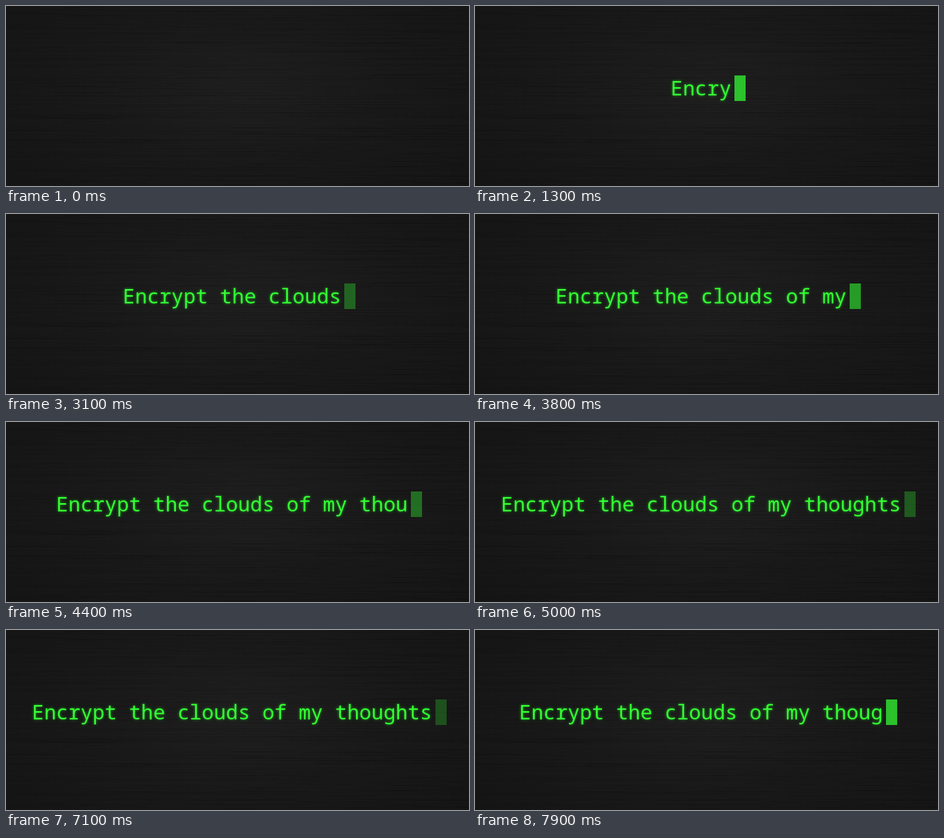
Write an HTML page with a canvas that moves like this. It is 828x324 px and loops after 8000 ms.

```html
<!DOCTYPE html>
<html lang="en">
<head>
<meta charset="utf-8">
<title>Typing line</title>
<style>
  html, body { margin: 0; width: 100%; height: 100%; overflow: hidden; background: #181818; }
  #stage { position: relative; width: 828px; height: 324px; overflow: hidden; }
  canvas { position: absolute; left: 0; top: 0; }
  #line, #cursor { position: absolute; left: 0; top: 125px; height: 46px; }
  #line {
    white-space: pre;
    font: 36px/46px "Noto Sans Mono", "DejaVu Sans Mono", monospace;
    letter-spacing: .08px;
    color: #33ff33;
    text-shadow: 0 0 5px rgba(40, 255, 40, .6);
  }
  #cursor { width: 20px; background: #2ed52e; }
</style>
</head>
<body>
<div id="stage">
  <canvas id="metal" width="828" height="324"></canvas>
  <div id="line"></div>
  <div id="cursor"></div>
</div>
<script>
  const LOOP = 8000, STEP = 100, BLINK = 1320, CURSOR_ON = 700;
  const ADVANCE = 21.68, MIDDLE = 404.2, GAP = 5.8;
  const TEXT = 'Encrypt the clouds of my thoughts';

  // [ms, letters shown]: typing, a pause, then backspacing
  const KEYS = [[0, 0], [650, 0], [770, 1], [1270, 5], [2050, 11], [3010, 18],
                [4300, 29], [4790, 33], [7650, 33], [7880, 30], [8000, 30]];

  const line = document.getElementById('line');
  const cursor = document.getElementById('cursor');

  function drawMetal() {
    const g = document.getElementById('metal').getContext('2d');
    let seed = 7;
    const rand = () => (seed = seed * 16807 % 2147483647) / 2147483647;

    g.setTransform(1, 0, 0, .55, 0, 0);
    const glow = g.createRadialGradient(425, 270, 0, 425, 270, 500);
    glow.addColorStop(0, '#212121');
    glow.addColorStop(.5, '#1b1b1b');
    glow.addColorStop(1, '#171717');
    g.fillStyle = glow;
    g.fillRect(0, 0, 828, 600);
    g.setTransform(1, 0, 0, 1, 0, 0);

    for (let y = 1; y < 324; y += 2) {
      g.fillStyle = `rgba(0,0,0,${.08 + .14 * rand()})`;
      g.fillRect(0, y, 828, 1);
    }
    for (let i = 0; i < 500; i++) {
      g.fillStyle = `rgba(0,0,0,${.05 + .12 * rand()})`;
      g.fillRect(rand() * 900 - 80, Math.floor(rand() * 324), 40 + rand() * 180, 1);
    }
  }

  function lettersAt(t) {
    const i = KEYS.findIndex(k => k[0] > t);
    const [t0, n0] = KEYS[i - 1], [t1, n1] = KEYS[i];
    return Math.floor(n0 + (n1 - n0) * (t - t0) / (t1 - t0));
  }

  const blink = cursor.animate(
    [{ opacity: 1, easing: 'ease' }, { opacity: 0, easing: 'ease' }, { opacity: 1 }],
    { duration: BLINK, iterations: Infinity });
  blink.pause();

  function render(now) {
    const t = Math.floor(now % LOOP / STEP) * STEP;
    const n = lettersAt(t);
    const left = MIDDLE - n * ADVANCE / 2;
    line.textContent = TEXT.slice(0, n);
    line.style.left = left + 'px';
    cursor.style.left = Math.round(left + n * ADVANCE + GAP) + 'px';
    cursor.style.visibility = t < CURSOR_ON ? 'hidden' : 'visible';
    blink.currentTime = t + .825 * BLINK;
  }

  drawMetal();
  const start = performance.now();
  function tick() {
    render(performance.now() - start);
    requestAnimationFrame(tick);
  }
  tick();
</script>
</body>
</html>
```
